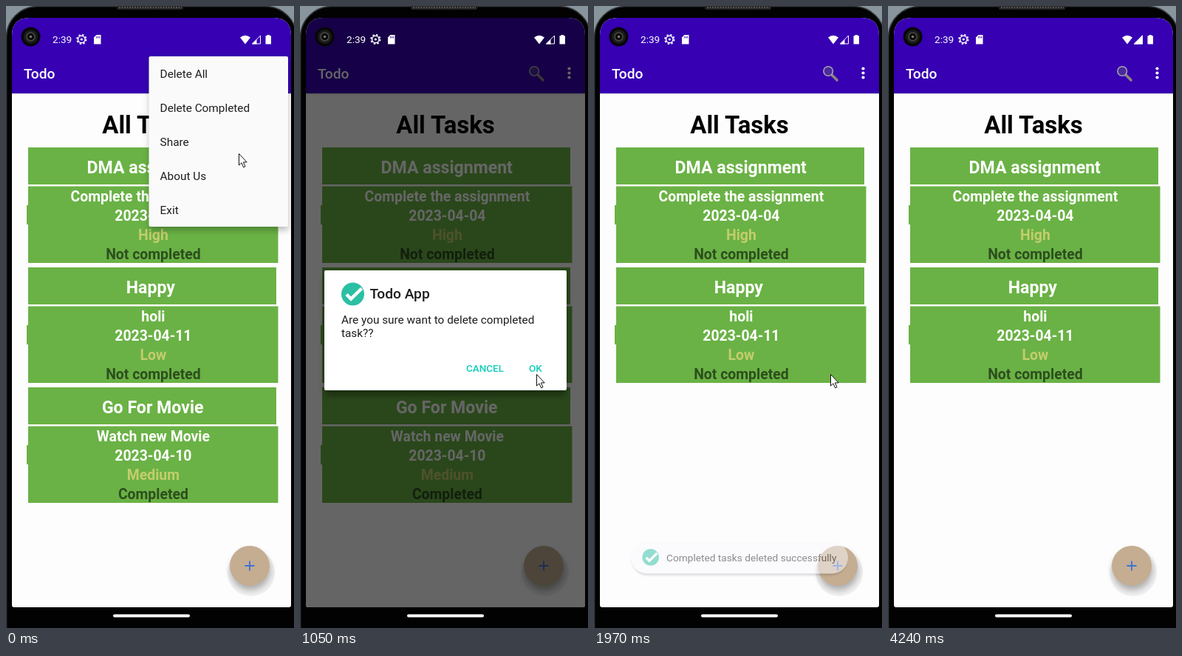
Write an HTML page that moves like this. It is 390 px wide and 840 px high and loops after 4670 ms.

```html
<!DOCTYPE html>
<html lang="en">
<head>
<meta charset="utf-8">
<title>Todo</title>
<style>
html, body { margin: 0; width: 100%; height: 100%; overflow: hidden; background: #000; }
svg { display: block; width: 100%; height: 100%; font-family: Roboto, sans-serif; }
.mid { text-anchor: middle; }
.bold { font-weight: 700; }
.medium { font-weight: 500; }
</style>
</head>
<body>
<svg id="stage" viewBox="0 0 390 840"></svg>
<script>
const LOOP = 4670;
// The picture only changes at these moments; between them it holds.
const STEPS = [0, 120, 270, 390, 510, 660, 780, 930, 1050, 1580, 1700, 1850, 1970,
  2120, 2430, 2990, 3110, 3260, 3410, 3970, 4090, 4240];

const TRACKS = {
  scrim: [[120, 0], [270, .2], [390, .45], [510, .6], [1700, .6], [1850, .13], [1970, 0]],
  dialog: [[120, 0], [270, .45], [390, .85], [510, 1], [1700, 1], [1850, .08], [1970, 0]],
  menu: [[270, 1], [390, .45], [510, 0]],
  row: [[0, 0], [120, 1]],
  rowRadius: [[0, 0], [120, 42], [270, 70], [510, 100]],
  press: [[1050, 0], [1580, .09], [1700, .16]],
  pressRadius: [[1050, 0], [1580, 18], [1700, 30]],
  toast: [[1850, 0], [1970, .5], [2120, 1], [3410, 1], [3970, .5], [4090, .12], [4240, 0]],
  x: [[0, 315], [120, 325], [270, 333], [510, 351], [660, 293], [780, 299], [930, 311], [1050, 320],
    [2430, 320], [2990, 342], [3110, 302], [3260, 341]],
  y: [[0, 199], [120, 221], [270, 249], [510, 351], [660, 440], [780, 499], [930, 499], [1050, 497],
    [2430, 497], [2990, 571], [3110, 716], [3260, 787]]
};

const rect = (x, y, w, h, fill, more = '') =>
  `<rect x="${x}" y="${y}" width="${w}" height="${h}" fill="${fill}" ${more}/>`;
const circle = (x, y, r, fill, more = '') =>
  `<circle cx="${x}" cy="${y}" r="${r}" fill="${fill}" ${more}/>`;
const text = (x, y, size, fill, str, cls = '') =>
  `<text x="${x}" y="${y}" font-size="${size}" fill="${fill}" class="${cls}">${str}</text>`;
const group = (id, content, more = '') => `<g id="${id}" ${more}>${content}</g>`;

const GREEN = '#6ab245', INK = '#1d1d1d', TEAL = '#12cdbb';

function card(y, title, task, date, level, state) {
  const lines = [[task, '#fff'], [date, '#fff'], [level, '#c3cd6c'], [state, '#2d4e1e']];
  return rect(30, y, 336, 50, GREEN) + rect(30, y + 52.5, 338.5, 103.5, GREEN) +
    rect(28, y + 78, 3, 26, GREEN) +
    text(198.7, y + 35, 23.1, '#fff', title, 'mid bold') +
    lines.map(([s, c], i) => text(199.4, y + 73.3 + 26 * i, 19.4, c, s, 'mid bold')).join('');
}

const tick = (x, y, r) => `<g transform="translate(${x} ${y}) scale(${r / 15.5})">` +
  circle(0, 0, 15.5, '#2bbfa4') +
  '<path d="M-8.5 .5L-2.5 6.5 12-7.5" fill="none" stroke="#fff" stroke-width="4.5"/></g>';

const phone = rect(0, 0, 390, 840, '#88959d') +
  rect(.5, .5, 393, 900, '#020202', 'rx="42" stroke="#34383b" stroke-width="1.6"') +
  rect(150, 0, 90, 5, '#222', 'rx="2"') +
  '<path d="M153 2H238" stroke="#555" stroke-width="2.5" stroke-dasharray="2 1.5"/>' +
  rect(145, 821.5, 104, 4, '#fff', 'rx="2"');

const toolbar = rect(8, 118, 378, 1.5, '#000', 'opacity=".12"') +
  rect(8, 16, 378, 102, '#3700b3') +
  text(24, 98, 19.2, '#fff', 'Todo', 'medium') +
  '<path d="M322 93L329 100" stroke="#8d8580" stroke-width="3.6" stroke-linecap="round"/>' +
  circle(317.2, 88, 6.3, '#4a2a9c', 'stroke="#a6a2ab" stroke-width="1.6"') +
  [84.5, 90.5, 96.5].map(y => circle(364.5, y, 2.1, '#fff')).join('');

const fab = circle(332, 765, 32, '#000', 'opacity=".05"') +
  circle(331, 762, 27, '#000', 'opacity=".28" filter="url(#soft)"') +
  circle(330, 756, 27, '#c5ad92') +
  '<path d="M323.5 756H336.5M330 749.5V762.5" stroke="#3f73d3" stroke-width="1.9"/>';

const menuItems = ['Delete All', 'Delete Completed', 'Share', 'About Us', 'Exit'];
const menu = rect(194, 72, 188, 231, '#000', 'opacity=".25" filter="url(#soft)"') +
  rect(193.5, 68, 188.5, 230, '#fafafa', 'rx="2"') +
  group('row', rect(193.5, 114, 188.5, 46, '#000', 'opacity=".16"') +
    circle(288, 137, 0, '#000', 'id="rowRipple" opacity=".09" clip-path="url(#rowClip)"')) +
  menuItems.map((s, i) => text(208.6, 96.5 + 46.1 * i, 15.35, INK, s)).join('');

const dialog = rect(34, 364, 326, 162, '#000', 'opacity=".35" filter="url(#soft)"') +
  rect(33, 357, 328, 162, '#fff', 'rx="2"') + tick(71.5, 389, 15.5) +
  text(94.6, 394.6, 19.2, INK, 'Todo App', 'medium') +
  text(56, 429, 15.35, INK, 'Are you sure want to delete completed') +
  text(56, 447, 15.35, INK, 'task??') +
  circle(319, 489, 0, '#000', 'id="press" clip-path="url(#buttonClip)"') +
  text(250.5, 494.3, 13.5, TEAL, 'CANCEL', 'mid medium') +
  text(318.8, 494.3, 13.5, TEAL, 'OK', 'mid medium');

const toast = rect(51, 726, 292, 43, '#000', 'rx="21.5" opacity=".28" filter="url(#softer)"') +
  rect(50, 723.5, 294, 43, '#faf8fd', 'rx="21.5"') + tick(76.7, 744.5, 11.3) +
  text(98, 749.5, 13.7, INK, 'Completed tasks deleted successfully');

const status = circle(33.5, 41.5, 13, '#070707') + circle(33.5, 41.5, 9.5, '#1b1b1b') +
  circle(33.5, 41.5, 5.5, '#0a0a0a', 'stroke="#4a4a44" stroke-width="1.5"') +
  circle(33.5, 41.5, 1.8, '#77776c') +
  text(63, 50, 13.6, '#fff', '2:39') +
  circle(102.3, 45, 4.7, 'none', 'stroke="#fff" stroke-width="1.5"') +
  circle(102.3, 45, 6.2, 'none', 'stroke="#fff" stroke-width="1.8" stroke-dasharray="2.4 2.47"') +
  circle(102.3, 45, 1.6, '#fff') +
  '<path d="M122.5 39H128.5V51.5H119V42.5Z" fill="#fff"/>' +
  '<path d="M122.5 41V43.5M124.5 41V43.5M126.5 41V43.5" stroke="#3700b3" stroke-width=".9"/>' +
  '<path d="M324 51.5L317 42.5Q324 37 331 42.5Z" fill="#fff"/>' +
  '<path d="M344.5 40V51H333.5Z" fill="none" stroke="#fff"/>' +
  '<path d="M339.5 45V51.5H333Z" fill="#fff"/>' +
  '<path id="signal" d="M345 39V51.5H333Z" fill="#fff"/>' +
  '<path d="M353.5 39H357V40.3H359V51.5H351.5V40.3H353.5Z" fill="#fff"/>';

const cursor = '<path id="cursor" d="M.5 .5V16L4 12.8 6.6 18.8 9 17.7 6.4 11.9H11.2Z" ' +
  'fill="#fff" stroke="#111" stroke-width="1" stroke-linejoin="round"/>';

const defs = `<defs>
  <clipPath id="screen"><path d="M8 40Q8 16 32 16H362Q386 16 386 40V809Q386 812 383 812H11Q8 812 8 809Z"/></clipPath>
  <clipPath id="rowClip">${rect(193.5, 114, 188.5, 46, '#000')}</clipPath>
  <clipPath id="buttonClip">${rect(292, 468, 54, 41, '#000', 'rx="4"')}</clipPath>
  <filter id="soft" x="-20%" y="-20%" width="140%" height="140%"><feGaussianBlur stdDeviation="4"/></filter>
  <filter id="softer" x="-20%" y="-30%" width="140%" height="160%"><feGaussianBlur stdDeviation="1.6"/></filter>
</defs>`;

const screen = rect(8, 16, 378, 796, '#fdfdfd') + toolbar +
  text(197, 172, 32.9, '#000', 'All Tasks', 'mid bold') +
  card(191, 'DMA assignment', 'Complete the assignment', '2023-04-04', 'High', 'Not completed') +
  card(353, 'Happy&#160;', 'holi', '2023-04-11', 'Low', 'Not completed') +
  group('movie', card(515, 'Go For Movie', 'Watch new Movie', '2023-04-10', 'Medium', 'Completed')) +
  fab + group('menu', menu) +
  rect(8, 16, 378, 796, '#000', 'id="scrim"') +
  group('dialog', dialog) + group('toast', toast) + status;

const stage = document.getElementById('stage');
stage.innerHTML = defs + phone + group('view', screen, 'clip-path="url(#screen)"') + cursor;

const set = (id, name, value) => document.getElementById(id).setAttribute(name, value);
const show = (id, on) => set(id, 'visibility', on ? 'visible' : 'hidden');

function valueAt(keys, t) {
  const i = keys.findIndex(k => k[0] > t);
  if (i === 0) return keys[0][1];
  if (i < 0) return keys[keys.length - 1][1];
  const [t0, a] = keys[i - 1], [t1, b] = keys[i];
  return a + (b - a) * (t - t0) / (t1 - t0);
}

function render(time) {
  const t = STEPS.filter(s => s <= time).pop();
  const v = name => valueAt(TRACKS[name], t);
  for (const id of ['scrim', 'dialog', 'menu', 'row', 'press', 'toast']) set(id, 'opacity', v(id));
  set('rowRipple', 'r', v('rowRadius'));
  set('rowRipple', 'cx', t < 270 ? 310 : 288);
  set('press', 'r', v('pressRadius'));
  set('cursor', 'transform', `translate(${v('x')} ${v('y')})`);
  show('cursor', t < 3410);
  show('movie', t < 1970);
  show('signal', t >= 2430);
}

const start = performance.now();
function loop() {
  render((performance.now() - start) % LOOP);
  requestAnimationFrame(loop);
}
loop();
</script>
</body>
</html>
```
